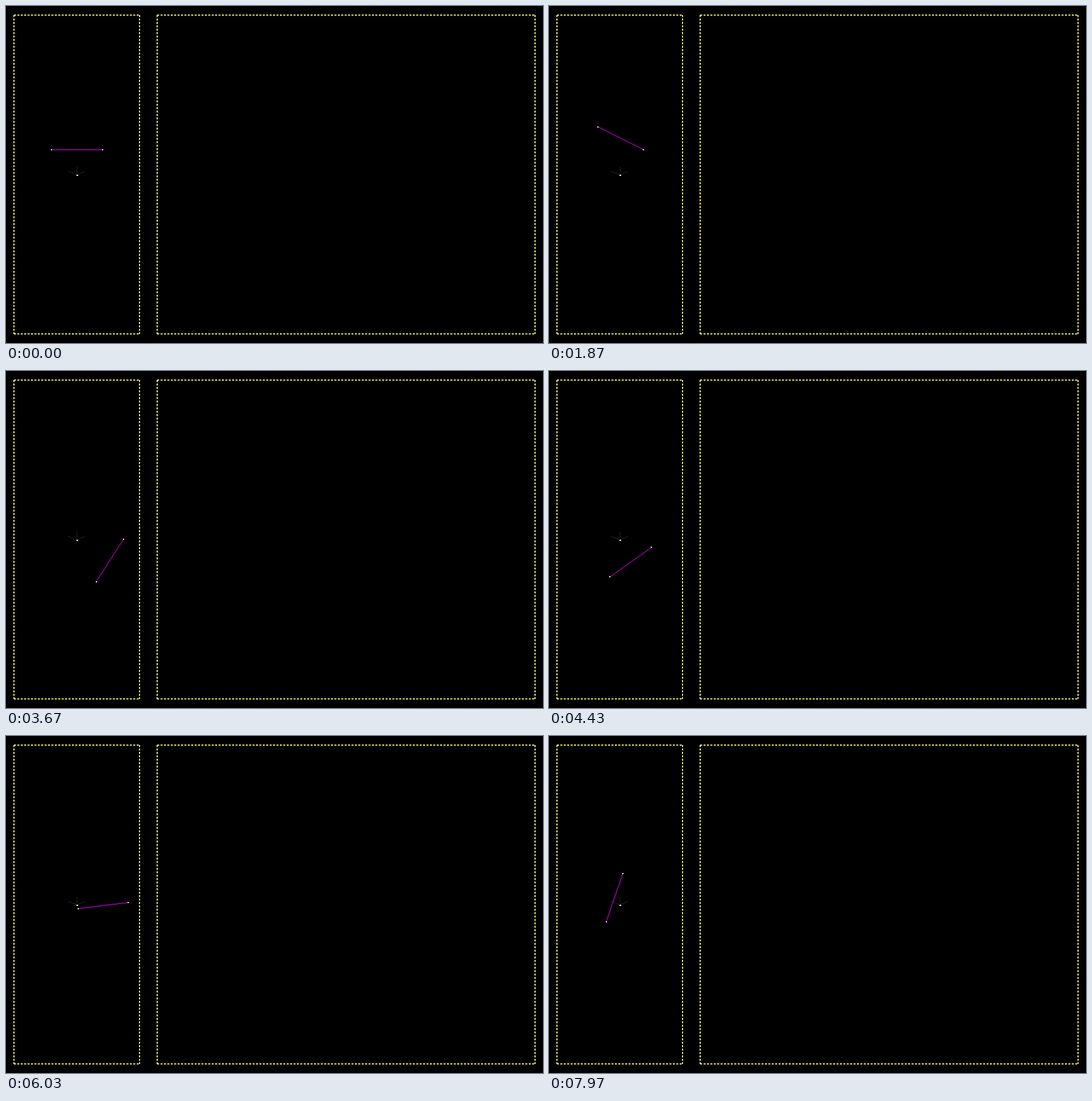
Write an HTML page with a canvas that moves like this. It is 945x593 px and loops after 8 s.

```html
<!DOCTYPE html>
<html lang="en">
<head>
<meta charset="utf-8">
<title>Drifting rod</title>
<style>
  html, body { margin: 0; width: 100%; height: 100%; overflow: hidden; background: #000; }
  canvas { display: block; }
</style>
</head>
<body>
<canvas id="stage" width="945" height="593"></canvas>
<script>
const ctx = document.getElementById('stage').getContext('2d');
const LOOP = 8000, STEP = 1000 / 30, HALF = 44.7;

// Poses of the rod: time, centre x, centre y, angle in degrees
const poses = [
  [0, 125, 252.5, 0],
  [1130, 126, 213.5, 43.6],
  [2630, 136, 273.5, -9.7],
  [3670, 183, 333.3, -57.5],
  [5130, 114.5, 322.2, -7.4],
  [6030, 170.8, 298.5, -7.1],
  [7970, 115.2, 284.5, -71.5]
];

function slope(i, k) {
  if (i === 0) return 0;
  const before = poses[i - 1], here = poses[i], after = poses[i + 1];
  const left = (here[k] - before[k]) / (here[0] - before[0]);
  if (!after) return left;
  const right = (after[k] - here[k]) / (after[0] - here[0]);
  const a = here[0] - before[0], b = after[0] - here[0];
  return (left * b + right * a) / (a + b);
}

// Cubic Hermite curve through the poses
function poseAt(t) {
  let i = 0;
  while (i < poses.length - 2 && t >= poses[i + 1][0]) i++;
  const p = poses[i], q = poses[i + 1];
  const span = q[0] - p[0], u = Math.min(1, (t - p[0]) / span);
  const blend = u * u * (3 - 2 * u);
  return [1, 2, 3].map(k =>
    p[k] + (q[k] - p[k]) * blend +
    span * u * (1 - u) * ((1 - u) * slope(i, k) - u * slope(i + 1, k)));
}

function line(x1, y1, x2, y2, color, width, dash = []) {
  ctx.strokeStyle = color;
  ctx.lineWidth = width;
  ctx.setLineDash(dash);
  ctx.beginPath();
  ctx.moveTo(x1, y1);
  ctx.lineTo(x2, y2);
  ctx.stroke();
}

function panel(left, right) {
  const top = 16, bottom = 577;
  const edge = (...ends) => line(...ends, '#f6f66a', 2, [3.5, 2.5]);
  edge(left, top, right, top);
  edge(left, bottom, right, bottom);
  edge(left, top, left, bottom);
  edge(right, top, right, bottom);
}

function dot(x, y, w = 2) {
  ctx.fillStyle = '#fff';
  ctx.fillRect(Math.round(x - w / 2), Math.round(y - 1), w, 2);
}

// Stepped line without smoothing
function rod(x1, y1, x2, y2) {
  const dx = x2 - x1, dy = y2 - y1;
  const steep = Math.abs(dy) > Math.abs(dx);
  const n = Math.round(Math.max(Math.abs(dx), Math.abs(dy)));
  ctx.fillStyle = '#84008c';
  for (let i = 0; i <= n; i++) {
    const x = Math.round(x1 + dx * i / n - (steep ? 1 : 0.5));
    const y = Math.round(y1 + dy * i / n - (steep ? 0.5 : 1));
    ctx.fillRect(x, y, steep ? 2 : 1, steep ? 1 : 2);
  }
  dot(x1, y1);
  dot(x2, y2);
}

function draw(t) {
  ctx.clearRect(0, 0, 945, 593);
  panel(14, 235);
  panel(266, 931);

  for (const [x, y] of [[125, 283], [109, 291], [139, 291]])
    line(125, 297, x, y, '#2a2a20', 1);
  dot(125, 297.5, 3);

  const [x, y, degrees] = poseAt(t);
  const angle = degrees * Math.PI / 180;
  const dx = HALF * Math.cos(angle), dy = HALF * Math.sin(angle);
  rod(x - dx, y - dy, x + dx, y + dy);
}

function tick() {
  const t = performance.now() % LOOP;
  draw(Math.floor((t + 4) / STEP) * STEP);
  requestAnimationFrame(tick);
}
tick();
</script>
</body>
</html>
```
